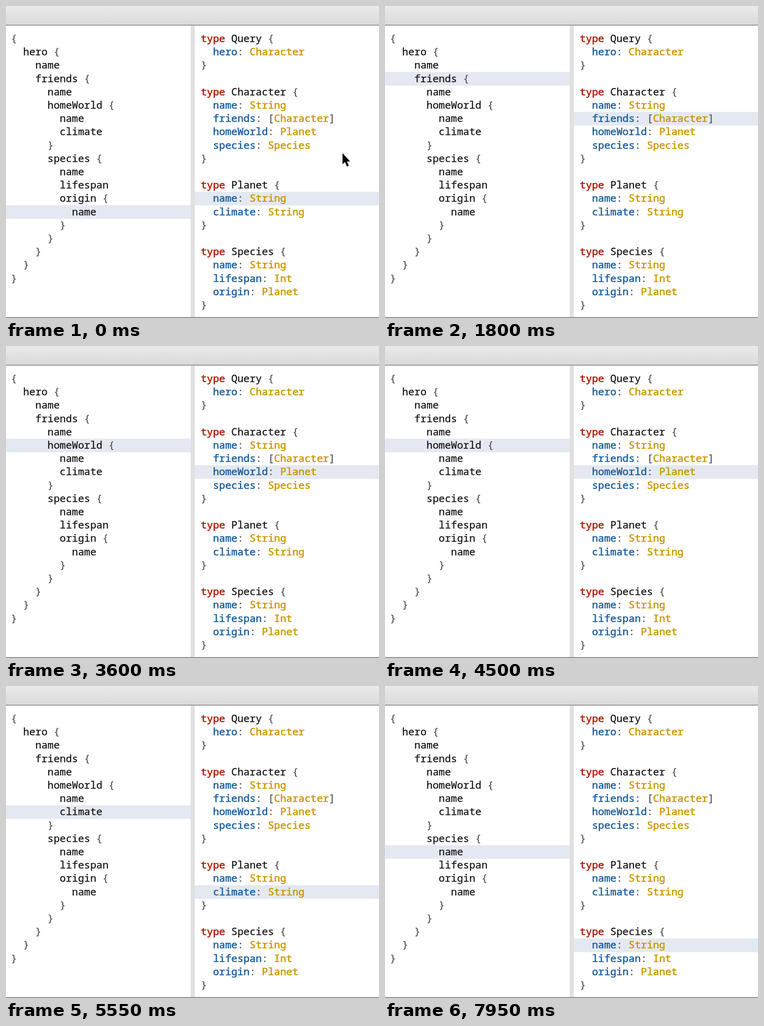
Write an HTML page that moves like this. It is 818 px wide and 684 px high and loops after 8 s.

```html
<!DOCTYPE html>
<html lang="en">
<head>
<meta charset="utf-8">
<title>Query and type schema</title>
<style>
  :root { --row: 29.2px; }
  html, body { margin: 0; width: 100%; height: 100%; overflow: hidden; background: #fff; }
  #stage { position: relative; width: 818px; height: 684px; overflow: hidden; background: #fff; }
  #stage > * { position: absolute; }
  .bar {
    left: 0; top: 0; width: 818px; height: 41px;
    background: linear-gradient(#eaeaea, #dadada);
    border-bottom: 2px solid #949494;
  }
  .divider { left: 405px; top: 43px; width: 9px; height: 640px; background: #e0e0e0; }
  .edge { left: 0; top: 682px; width: 818px; height: 2px; background: #8a8a8a; }
  pre {
    margin: 0; top: 56px; color: #141414;
    font: 400 22.3px/var(--row) "Roboto Mono", "Noto Sans Mono", "DejaVu Sans Mono", monospace;
    font-variant-ligatures: none;
    -webkit-text-stroke: .35px;
  }
  #query { left: 10.8px; }
  #schema { left: 427.2px; }
  .punct { color: #555; }
  .keyword, .field, .type { -webkit-text-stroke: .7px; }
  .keyword { color: #b11a04; }
  .field { color: #1f61a0; }
  .type { color: #ca9800; }

  .mark {
    top: 56.6px; height: 30.8px; background: #e4e9f1;
    transform: translateY(calc(var(--line) * var(--row)));
    animation: 8s step-end infinite;
  }
  .mark.left { left: 0; width: 405px; animation-name: walk-query; }
  .mark.right { left: 414px; width: 404px; animation-name: walk-schema; }
  @keyframes walk-query {
    0% { --line: 13; }
    .5% { --line: 1; }
    11.125% { --line: 2; }
    22.375% { --line: 3; }
    33.625% { --line: 4; }
    44.875% { --line: 5; }
    56.75% { --line: 6; }
    68% { --line: 7; }
    79.25% { --line: 9; }
    90.5%, 100% { --line: 10; }
  }
  @keyframes walk-schema {
    0% { --line: 12; }
    .5% { --line: 1; }
    11.125% { --line: 5; }
    22.375% { --line: 6; }
    33.625% { --line: 5; }
    44.875% { --line: 7; }
    56.75% { --line: 12; }
    68% { --line: 13; }
    79.25% { --line: 8; }
    90.5%, 100% { --line: 17; }
  }
  .pointer { left: 0; top: 0; animation: blink-out 8s step-end infinite; }
  @keyframes blink-out {
    0% { opacity: 1; }
    .5%, 100% { opacity: 0; }
  }
</style>
</head>
<body>
<div id="stage">
  <div class="mark left"></div>
  <div class="mark right"></div>
  <pre id="query">{
  hero {
    name
    friends {
      name
      homeWorld {
        name
        climate
      }
      species {
        name
        lifespan
        origin {
          name
        }
      }
    }
  }
}</pre>
  <pre id="schema">type Query {
  hero: Character
}

type Character {
  name: String
  friends: [Character]
  homeWorld: Planet
  species: Species
}

type Planet {
  name: String
  climate: String
}

type Species {
  name: String
  lifespan: Int
  origin: Planet
}</pre>
  <div class="bar"></div>
  <div class="divider"></div>
  <div class="edge"></div>
  <svg class="pointer" width="818" height="684">
    <path d="M738 322.5V347l5.4-5 4.2 10 4.2-1.8-4.2-9.4h6.9z"
          fill="#000" stroke="#fff" stroke-width="2.4" stroke-linejoin="round" paint-order="stroke"/>
  </svg>
</div>
<script>
  const wrap = (kind, text) => `<span class="${kind}">${text}</span>`;

  function colour(id, pattern, classify) {
    const block = document.getElementById(id);
    block.innerHTML = block.textContent.replace(pattern, token => wrap(classify(token), token));
  }

  colour("query", /[{}]/g, () => "punct");
  colour("schema", /[{}:[\]]|\btype\b|\w+(?=:)|(?<=: \[?)\w+/g, token =>
    /\W/.test(token) ? "punct" :
    token === "type" ? "keyword" :
    /^[a-z]/.test(token) ? "field" : "type");
</script>
</body>
</html>
```
